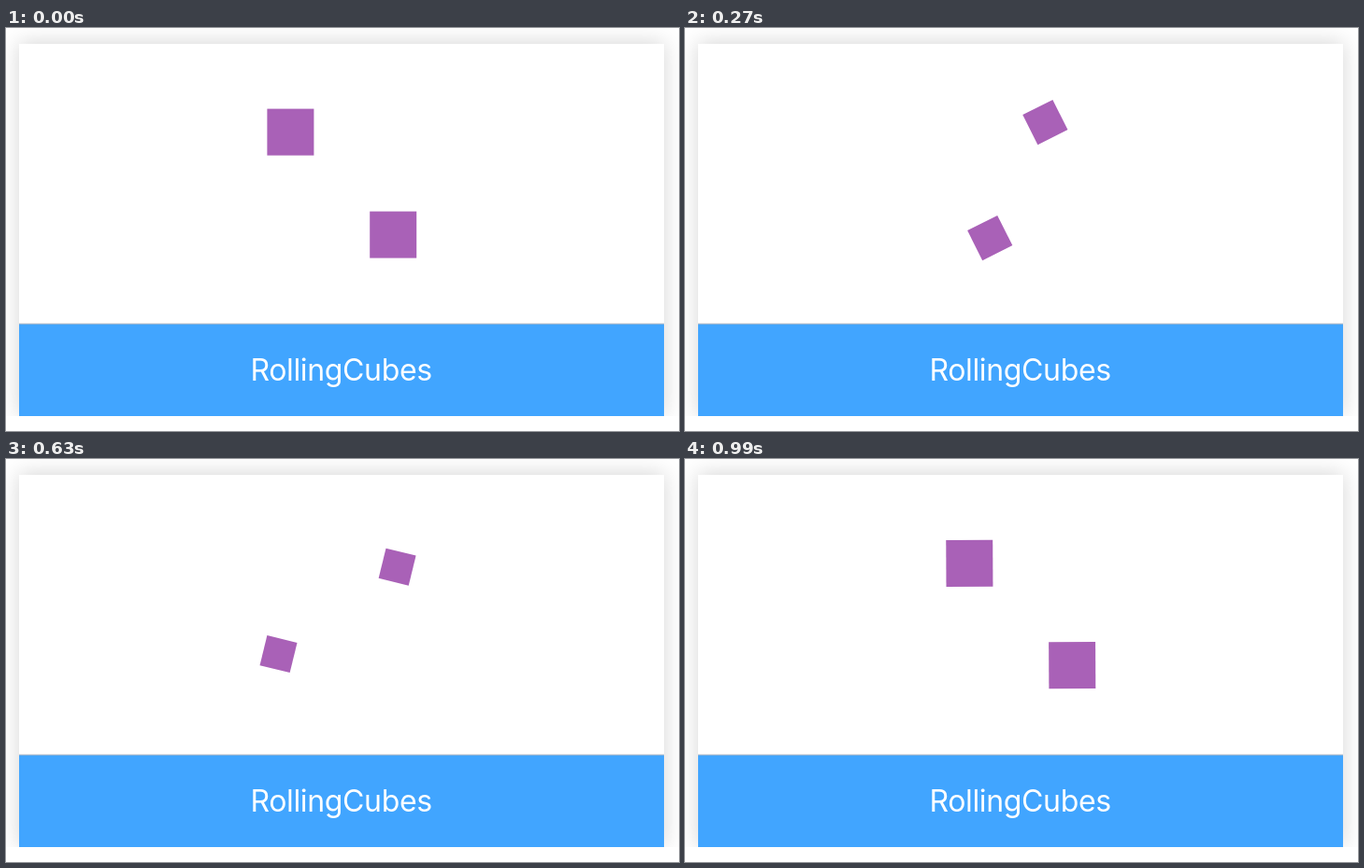
Recreate the animation shown at these times as an HTML page. Size 720 px wide and 432 px high, loop 1.02 s.

```html
<!DOCTYPE html>
<html lang="en">
<head>
<meta charset="utf-8">
<title>RollingCubes</title>
<style>
  html, body { margin: 0; width: 100%; height: 100%; overflow: hidden; background: #fff; }
  .view { position: absolute; left: 0; top: 0; width: 720px; height: 416px; overflow: hidden; }
  .card { position: absolute; left: 14px; top: 16.5px; width: 690px; height: 399.5px;
          background: #fff; box-shadow: 0 -1px 22px rgba(0, 0, 0, .17); }
  svg { position: absolute; left: 0; top: 0; }
  text { font: 400 32px Inter, Roboto, sans-serif; letter-spacing: -.35px; }
</style>
</head>
<body>
<div class="view"><div class="card"></div></div>
<svg width="720" height="432" viewBox="0 0 720 432">
  <rect x="14" y="317" width="690" height="99" fill="#41a5ff"/>
  <rect x="14" y="316.6" width="690" height="1" fill="#b5b9c0"/>
  <text x="358.6" y="378" text-anchor="middle" fill="#fff">RollingCubes</text>
  <g fill="#a961b7">
    <rect class="cube" x="-25" y="-25" width="50" height="50"/>
    <rect class="cube" x="-25" y="-25" width="50" height="50"/>
  </g>
</svg>
<script>
const LOOP = 1020, LEG = LOOP / 2, STEP = 30;
const SMALL = 0.6;
const topLeft = [304.4, 111.6], bottomRight = [414.2, 221.6];
// Each cube rolls start -> corner -> the other cube's start.
const routes = [
  [topLeft, [419.4, 96.6], bottomRight],
  [bottomRight, [289.2, 226.6], topLeft]
];
const cubes = document.querySelectorAll('.cube');

const mix = (a, b, k) => a + (b - a) * k;

// Cubic bezier timing curve (.4, 0, .38, 1), solved by bisection.
function ease(x) {
  let lo = 0, hi = 1;
  for (let i = 0; i < 30; i++) {
    const s = (lo + hi) / 2, r = 1 - s;
    const at = 1.2 * r * r * s + 1.14 * r * s * s + s * s * s;
    if (at < x) lo = s; else hi = s;
  }
  return lo * lo * (3 - 2 * lo);
}

function draw(ms) {
  const t = Math.floor((ms % LOOP) / STEP) * STEP;
  const leg = t < LEG ? 0 : 1;
  const k = ease((t - leg * LEG) / LEG);
  const scale = leg ? mix(SMALL, 1, k) : mix(1, SMALL, k);
  const angle = 90 * (leg + k);
  cubes.forEach((cube, i) => {
    const from = routes[i][leg], to = routes[i][leg + 1];
    const x = mix(from[0], to[0], k), y = mix(from[1], to[1], k);
    cube.setAttribute('transform', `translate(${x} ${y}) rotate(${angle}) scale(${scale})`);
  });
}

let start;
function tick(now) {
  if (start === undefined) start = now;
  draw(now - start);
  requestAnimationFrame(tick);
}
draw(0);
requestAnimationFrame(tick);
</script>
</body>
</html>
```
